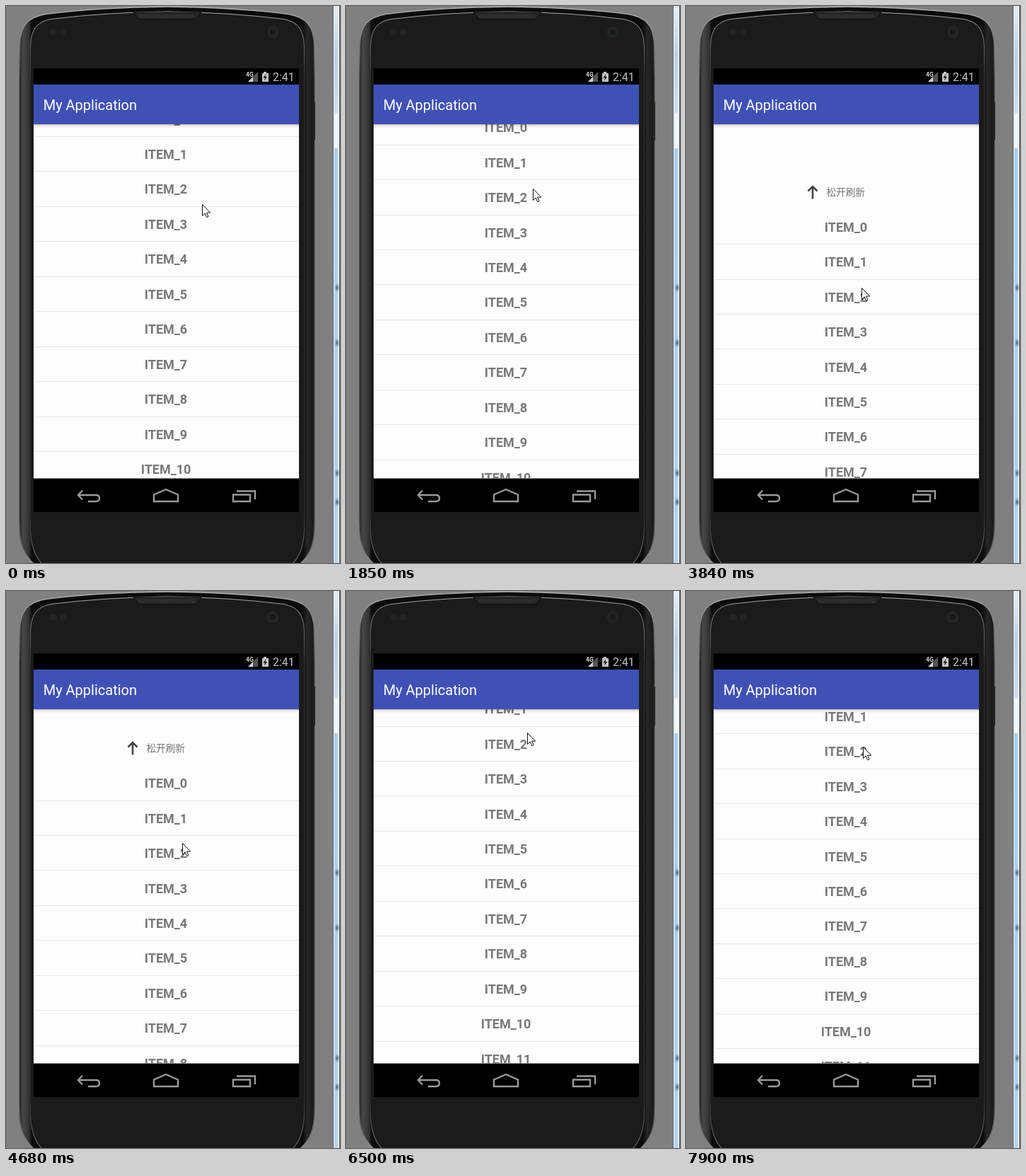
Write an HTML page that moves like this. It is 472 by 787 pixels and loops after 8 s.

```html
<!DOCTYPE html>
<html lang="en">
<head>
<meta charset="utf-8">
<title>Pull to refresh</title>
<style>
  html, body { margin: 0; width: 100%; height: 100%; overflow: hidden; background: #808080; }
  svg { display: block; width: 472px; height: 787px; }
  text { font-family: Roboto, sans-serif; }
  .row { font-size: 18px; font-weight: 700; fill: #787878; text-anchor: middle; }
  .hint { font-family: "Noto Sans CJK SC", "Noto Sans CJK", sans-serif; font-size: 13.6px; fill: #757575; }
  .nav { fill: none; stroke: #999; stroke-width: 2.4; }
</style>
</head>
<body>
<svg viewBox="0 0 472 787">
  <defs>
    <linearGradient id="rim" gradientUnits="userSpaceOnUse" x1="19" x2="436" y1="0" y2="0">
      <stop offset="0" stop-color="#242424"/>
      <stop offset=".012" stop-color="#484848"/>
      <stop offset=".032" stop-color="#333"/>
      <stop offset=".042" stop-color="#0c0c0c"/>
      <stop offset=".96" stop-color="#0c0c0c"/>
      <stop offset=".975" stop-color="#262626"/>
      <stop offset="1" stop-color="#181818"/>
    </linearGradient>
    <linearGradient id="edge" gradientUnits="userSpaceOnUse" x1="0" x2="0" y1="0" y2="787">
      <stop offset="0" stop-color="#b4b4b4"/>
      <stop offset=".05" stop-color="#858585"/>
      <stop offset=".13" stop-color="#303030"/>
      <stop offset=".92" stop-color="#303030"/>
      <stop offset="1" stop-color="#909090"/>
    </linearGradient>
    <linearGradient id="shade" x1="0" x2="0" y1="0" y2="1">
      <stop offset="0" stop-color="#000" stop-opacity=".28"/>
      <stop offset=".4" stop-color="#000" stop-opacity=".07"/>
      <stop offset="1" stop-color="#000" stop-opacity="0"/>
    </linearGradient>
    <linearGradient id="strip" gradientUnits="userSpaceOnUse" x1="0" x2="0" y1="0" y2="787">
      <stop offset="0" stop-color="#e4edf7"/>
      <stop offset=".09" stop-color="#bdd0e6"/>
      <stop offset=".19" stop-color="#cbdef2"/>
      <stop offset=".195" stop-color="#f3f6fa"/>
      <stop offset=".255" stop-color="#f3f6fa"/>
      <stop offset=".256" stop-color="#a9cdf2"/>
      <stop offset="1" stop-color="#b5d2f0"/>
    </linearGradient>
    <radialGradient id="smudge">
      <stop offset="0" stop-color="#3f5870"/>
      <stop offset="1" stop-color="#6f90b4" stop-opacity="0"/>
    </radialGradient>
    <clipPath id="list"><rect x="39" y="167" width="375" height="500.500"/></clipPath>
  </defs>

  <rect x="462" width="1" height="787" fill="#5c6670"/>
  <rect x="463" width="9" height="787" fill="#f4f8fc"/>
  <rect x="464" width="5" height="787" fill="url(#strip)"/>
  <rect x="471" width="1" height="787" fill="#3c4854"/>
  <g id="marks"></g>

  <path d="M434 135h3v55h-3z" fill="#1c1c1c"/>
  <path d="M40 789C28 778 20 766 19.500 740V55C20 27 31 16 56 11.500Q130 2 228 1Q326 2 399 11.500C424 16 435 27 435.500 55V740C435 766 427 778 415 789Z"
        fill="url(#rim)" stroke="url(#edge)" stroke-width="1.500"/>
  <path d="M53 790C42 780 35 764 34.500 738V60C35 34 42 23 64 18.500Q140 9 228 8Q316 9 392 18.500C414 23 421 34 421.500 60V738C421 764 414 780 403 790Z"
        fill="#1b1b1b" stroke="url(#edge)"/>
  <path d="M180 9H276L270 17Q268 19 264 19H192Q188 19 186 17Z" fill="#262626" stroke="#0b0b0b"/>
  <path d="M188 14H268" stroke="#3a3a3a" stroke-width="5" stroke-dasharray="1 1.500"/>
  <g fill="#242424">
    <circle cx="67" cy="37" r="5"/><circle cx="81" cy="37" r="5"/>
    <circle cx="377" cy="37" r="8.500"/>
    <circle cx="377" cy="37" r="4" fill="#151a1d"/>
  </g>

  <rect x="39" y="88" width="375" height="627" fill="#000"/>
  <g clip-path="url(#list)">
    <rect x="39" y="167" width="375" height="501" fill="#fdfdfd"/>
    <g id="head">
      <path id="arrow" d="M0 9.500V-8M-6.500 -1.500L0 -8L6.500 -1.500" fill="none" stroke="#444" stroke-width="2.600"/>
      <text id="hint" class="hint" x="198.500" y="5"></text>
    </g>
    <g id="rows"></g>
    <rect x="39" y="167" width="375" height="6" fill="url(#shade)"/>
  </g>

  <rect x="39" y="111" width="375" height="56" fill="#3f51b5"/>
  <text x="52.700" y="147" font-size="20" fill="#fff">My Application</text>

  <text x="339" y="100" font-size="8.500" font-weight="700" fill="#d0d0d0">4G</text>
  <path d="M356 93V107H342Z" fill="#555"/>
  <path d="M349 100V107H342Z" fill="#d0d0d0"/>
  <path d="M364 93h4v2h3v12h-9v-12h2z" fill="#c4c4c4"/>
  <path d="M367.500 96l-4 5.500h2.500l-1 4 4-5.500h-2.500z" fill="#111"/>
  <text x="377" y="106" font-size="16" fill="#c0c0c0">2:41</text>

  <g class="nav">
    <path d="M108 684.500L102 691L108 697.500M102 691H127Q132 691 132 695.500T127 700H116"/>
    <path d="M209 700V690.500L226 683L243 690.500V700Z"/>
    <path d="M321 690.500H345V700H321ZM326 685.500H352V697"/>
  </g>

  <path id="mouse" d="M.5 .5V16.500L4.200 13L6.700 18.700L9 17.700L6.500 12.100H11.700Z" fill="#fff" stroke="#111"/>
</svg>

<script>
const LOOP = 8000, FIRST = 300, STEP = 140, ROW = 49.45;
const $ = id => document.getElementById(id);

// time, list offset, mouse x, mouse y: drags, with still spans between
const KEYS = [
  [160, 160.5, 277, 280],
  [1280, 149.5, 266, 228],
  [1840, 172.2, 264, 258],
  [2680, 207, 258, 295],
  [3800, 312.7, 248, 398],
  [4270, 312.7, 248, 398],
  [5340, 195.5, 252, 277],
  [6460, 117.7, 256, 200],
  [7380, 108, 254, 188],
  [7860, 128.3, 250, 220]
];

function add(tag, parent, attrs) {
  const el = document.createElementNS("http://www.w3.org/2000/svg", tag);
  for (const k in attrs) el.setAttribute(k, attrs[k]);
  parent.append(el);
  return el;
}

for (const y of [398, 476, 660, 701])
  add("ellipse", $("marks"), { cx: 468, cy: y, rx: 4, ry: 7, fill: "url(#smudge)" });

const rows = Array.from({ length: 13 }, (_, i) => {
  const label = add("text", $("rows"), { class: "row", x: 226 });
  label.textContent = "ITEM_" + i;
  const line = add("rect", $("rows"), { x: 39, width: 375, height: 1, fill: "#e7e7e7" });
  return { label, line };
});

function poseAt(t) {
  const n = KEYS.findIndex(k => k[0] > t);
  if (n === 0) return KEYS[0];
  if (n < 0) return KEYS.at(-1);
  const a = KEYS[n - 1], b = KEYS[n], f = (t - a[0]) / (b[0] - a[0]);
  return a.map((v, i) => v + (b[i] - v) * f);
}

const move = (el, x, y, more = "") => el.setAttribute("transform", `translate(${x} ${y})${more}`);

function draw(t) {
  const [, top, mx, my] = poseAt(t);
  rows.forEach(({ label, line }, i) => {
    const y = top + ROW * i;
    label.setAttribute("y", Math.round(y) + 6);
    line.setAttribute("y", Math.floor(y + 23.9));
  });
  const ready = top > 250;
  move($("head"), 0, Math.round(top - 50));
  move($("arrow"), 179, 0, ready ? "" : " rotate(180)");
  $("hint").textContent = ready ? "松开刷新" : "下拉刷新";
  move($("mouse"), Math.round(mx), Math.round(my));
}

const snap = t => FIRST + Math.floor((t - FIRST) / STEP) * STEP;

const start = performance.now();
function frame() {
  const t = (performance.now() - start) % LOOP;
  draw(t < FIRST ? 0 : snap(t));
  requestAnimationFrame(frame);
}
frame();
</script>
</body>
</html>
```
